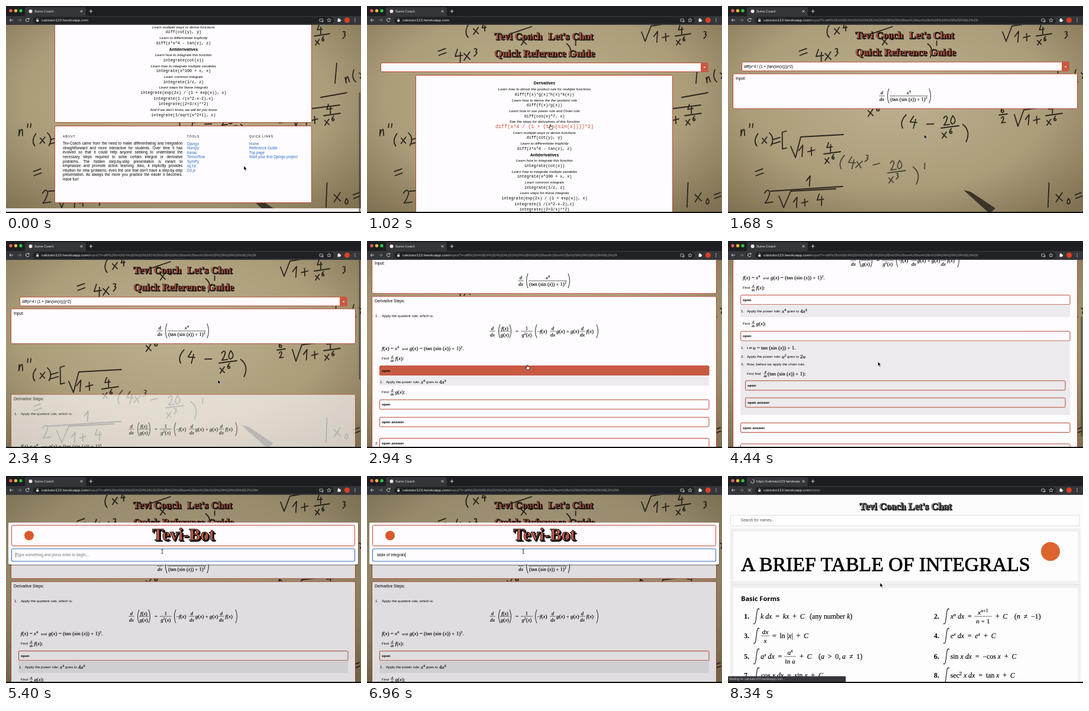
Animation, 600 px wide and 351 px high, one loop 8400 ms. Source, as an HTML page:

```html
<!DOCTYPE html>
<html lang="en">
<head>
<meta charset="utf-8">
<title>Sums Coach</title>
<style>
html, body { margin: 0; width: 100%; height: 100%; overflow: hidden; background: #000; }
svg { display: block; }
#stage { width: 600px; height: 351px; }
text, .about { font-family: "Liberation Sans", Arial, sans-serif; white-space: pre; }
.serif { font-family: "Liberation Serif", Times, serif; }
.mono { font-family: "Liberation Mono", Courier, monospace; }
.head { font-family: "Open Sans", "Noto Sans", sans-serif; }
.about { font-size: 6.3px; line-height: 7.6px; color: #000; text-align: justify; text-align-last: justify; white-space: normal; }
.about span { display: block; text-align-last: left; }
</style>
</head>
<body>
<svg id="stage" viewBox="0 0 600 351"></svg>
<script>
const LOOP = 8400, STEP = 60;
const RED = '#c85a42', EDGE = '#b84630', WHITE = '#fefcfe', INK = '#000';
const SITE = 'calctutor123.herokuapp.com';
const QUERY = 'diff(x^4 / (1 + (tan(sin(x))))^2)';
const PATH = '/input/?i=diff%28x%5E4%20/%20%281%20%2B%20%28tan%28sin%28x%29%29%29%29%5E2%29';
const $ = id => document.getElementById(id);

// Drawing helpers; text is centred vertically on y.
const text = (x, y, s, size, attrs = '') =>
  `<text x="${x}" y="${y + size * .35}" font-size="${size}" ${attrs}>${s}</text>`;
const mid = (x, y, s, size, attrs = '') => text(x, y, s, size, 'text-anchor="middle" ' + attrs);
const rect = (x, y, w, h, fill, attrs = '') =>
  `<rect x="${x}" y="${y}" width="${w}" height="${h}" fill="${fill}" ${attrs}/>`;
const card = (x, y, w, h, attrs = '') =>
  rect(x + .5, y + .5, w - 1, h - 1, WHITE, `stroke="${EDGE}" rx="2" ${attrs}`);
const line = (d, attrs = '') => `<path d="${d}" fill="none" stroke="#111" ${attrs}/>`;
const group = (id, s, attrs = '') => `<g id="${id}" ${attrs}>${s}</g>`;
const title = (x, y, s, size, fill, attrs = '') =>
  text(x + size * .07, y + size * .06, s, size, `class="serif" font-weight="700" stroke="#111" ${attrs}`) +
  text(x, y, s, size, `class="serif" font-weight="700" fill="${fill}" stroke="#111" stroke-width="${size * .03}" ${attrs}`);

// Math markup: ^ raises, letters are italic, [words] and function names stay upright.
const markup = s => s.replace(/\^(?:\{(.*?)\}|(.))|\[(.*?)\]|tan|sin|cos|sec|ln|[a-zA-Z]+/g, (all, many, one, plain) =>
  many || one ? `<tspan baseline-shift="super" font-size="70%">${markup(many || one)}</tspan>`
  : plain ? plain
  : /^(tan|sin|cos|sec|ln)$/.test(all) ? all
  : `<tspan font-style="italic">${all}</tspan>`);
const math = (x, y, s, size = 9, attrs = '') =>
  text(x, y, markup(s), size, 'class="serif" stroke="#000" stroke-width=".15" ' + attrs);
const frac = (x, y, top, bottom, w, size = 8.6) =>
  math(x, y - size * .62, top, size, 'text-anchor="middle"') +
  math(x, y + size * .68, bottom, size, 'text-anchor="middle"') +
  line(`M${x - w / 2},${y}h${w}`, 'stroke-width=".6"');
const ddx = (x, y, size = 8.6) => frac(x, y, 'd', 'dx', size * 1.1, size);
const paren = (x, y, h, dir) => line(`M${x + 2 * dir},${y - h / 2}q${-5 * dir},${h / 2} 0,${h}`, 'stroke-width=".9"');
const integral = (x, y) => line(`M${x + 9},${y - 12}q-3,-3 -4,4l-2,15q-1,8 -4,5`, 'stroke-width="1.1"');

// Pen strokes of the handwriting, 14 units tall above the baseline.
const STROKES = {
  0: 'M4,-13q-8,10 -2,13q8,-3 2,-13', 1: 'M0,-8l6,-6l-3,14', 2: 'M0,-11q5,-6 6,0q-2,6 -7,11h9',
  3: 'M1,-13q8,-1 2,6q6,1 -4,8', 4: 'M4,-14l-4,8h9M7,-10l-2,12', 6: 'M6,-13q-9,8 -5,12q5,2 5,-3q-2,-4 -6,0',
  x: 'M0,-8l6,8M7,-9l-8,9', n: 'M0,-8l-1,8q2,-9 5,-8v8', '(': 'M5,-15q-8,10 -3,18', ')': 'M0,-15q8,8 1,19',
  '=': 'M0,-8l9,-2M0,-3l9,-2', '-': 'M0,-5l9,-1', '+': 'M0,-5l9,-1M5,-10l-1,10',
  '[': 'M6,-17l-5,1l-1,20l5,-1', '"': 'M1,-15l-1,5M5,-15l-1,5', "'": 'M2,-17l-1,6', '|': 'M5,-18l-4,22'
};

function backdrop() {
  const stroke = (d, attrs = '') => line(d, `style="stroke:#2a251d" stroke-width="1.8" stroke-linecap="round" stroke-linejoin="round" ${attrs}`);
  const pen = (x, y, s, size, turn = -8) => `<g transform="translate(${x},${y}) rotate(${turn}) scale(${size / 14})">` +
    [...s].map((c, i) => STROKES[c] ? stroke(STROKES[c], `transform="translate(${i * 11},0)" vector-effect="non-scaling-stroke"`) : '').join('') + '</g>';
  const power = (x, y, base, up, size, turn) => pen(x, y, base, size, turn) +
    pen(x + base.length * size * .8, y - size * .5, up, size * .6, turn);
  const quotient = (x, y, top, up, size) => pen(x, y - 4, top, size) +
    stroke(`M${x - 6},${y + 1}l${size * 2},-4`) + power(x - 3, y + size + 3, 'x', up, size);
  return `<defs><radialGradient id="paper" cx=".48" cy=".45" r=".72">
    <stop offset="0" stop-color="#bdb08e"/><stop offset=".6" stop-color="#ab9d7a"/><stop offset="1" stop-color="#7f7151"/>
    </radialGradient></defs>` + rect(0, 0, 600, 351, 'url(#paper)') +
    power(168, 50, '(x', '4', 17) + stroke('M240,48l38,-13') + power(262, 66, 'x', '6', 17) + pen(340, 82, ")'", 17) +
    pen(122, 88, '=', 20) + power(150, 94, '4x', '3', 20) +
    stroke('M464,44l6,16l10,-26l66,-10') + pen(486, 62, '1+', 18) + quotient(527, 50, '4', '6', 13) + pen(570, 54, '3', 11) +
    stroke('M559,97l-3,34') + pen(576, 130, 'n(x', 16, -18) + stroke('M532,155l44,-8') + quotient(543, 185, '4', '6', 14) +
    power(238, 187, 'x', '6', 17) + pen(293, 203, '(4 -', 18, 5) + quotient(366, 206, '20', '6', 15) + pen(400, 224, ')', 22) +
    pen(462, 181, '6', 10) + stroke('M458,185l14,-2') + pen(463, 198, '2', 10) +
    stroke('M484,184l6,20l10,-28l64,-8') + pen(504, 202, '1+', 17) +
    pen(23, 220, 'n"', 18, -4) + pen(46, 234, '(x)', 16, -4) + pen(76, 238, '=[', 20, -4) +
    stroke('M106,238l8,19l9,-35l72,-4') + pen(121, 256, '1+', 19) + quotient(168, 250, '4', '6', 14) +
    `<g opacity=".75">` + power(189, 272, '(4x', '3', 18, 4) + pen(246, 276, '-', 18) +
    quotient(276, 282, '20', '3', 15) + pen(316, 296, ")'", 22) + '</g>' +
    pen(48, 292, '=', 20) + pen(134, 306, '1', 17) + stroke('M72,314l122,-8') + pen(64, 334, '2', 21) +
    stroke('M86,322l8,20l12,-28l76,-4') + pen(112, 342, '1+ 4', 17) +
    pen(538, 334, '|', 26) + pen(556, 332, 'x', 22) + pen(574, 336, '0', 10) + pen(588, 330, '=', 17) +
    `<path d="M398,312l12,3l42,28l-10,9z" fill="#3b342a"/>`;
}

const banner = y =>
  title(215, y, 'Tevi Coach', 17, RED) + title(306, y, "Let's Chat", 17, RED) +
  title(300, y + 29, 'Quick Reference Guide', 17, RED, 'text-anchor="middle"');
const searchBar = y => card(23, y, 554, 16) + rect(564, y, 13, 16, RED, 'rx="2"') +
  mid(570.5, y + 8, '=', 6, 'fill="#fff" font-weight="700"');

function referencePage() {
  const caption = (y, s) => mid(300, y, s, 6.15, 'font-style="italic"');
  const code = (y, s) => mid(300, y, s, 6.72, 'class="mono"');
  const heading = (y, s) => mid(300, y, s, 6.8, 'font-weight="700"');
  const pairs = (y, list) => list.map(([a, b], i) =>
    caption(y + 18.4 * i, a) + (b ? code(y + 18.4 * i + 8.5, b) : '')).join('');
  const links = (x, head, list) => text(x, 400.5, head, 5, 'letter-spacing=".85"') +
    list.map((s, i) => text(x, 412.3 + 7.6 * i, s, 6.33, 'fill="#2a6cc4"')).join('');
  return banner(51) + searchBar(96) + card(82, 117, 435, 260) + heading(130.5, 'Derivatives') +
    pairs(141, [
      ['Learn how to derive the product rule for multiple functions', 'diff(f(x)*g(x)*h(x)*k(x))'],
      ['Learn how to derive the the quotient rule', 'diff(f(x)/g(x))'],
      ['Learn how to use power rule and Chain rule', 'diff(cos(x)^7, x)'],
      ['See the steps for derivatives of this function', ''],
      ['Learn multiple ways to derive functions', 'diff(cot(y), y)'],
      ['Learn to differentiate implicitly', 'diff(z*x^4 - tan(z), z)']]) +
    mid(300, 204.7, QUERY, 6.72, 'id="pick" class="mono"') + heading(252.5, 'Antiderivatives') +
    pairs(262, [
      ['Learn how to integrate this function', 'integrate(cot(x))'],
      ['Learn how to integrate multiple variables', 'integrate(x^100 + x, x)'],
      ['Learn common integrals', 'integrate(1/z, z)'],
      ['Learn steps for these integrals', 'integrate(exp(2x) / (1 + exp(x)), x)']]) +
    code(335.5, 'integrate(1 /(x^2-x-2),x)') + code(344.7, 'integrate((2+3/x)**2)') +
    caption(354.8, "And if we don't know, we will let you know") + code(363.3, 'integrate(1/sqrt(x^2+1), x)') +
    card(82, 382, 435, 131) + text(96, 400.5, 'ABOUT', 5, 'letter-spacing=".85"') +
    `<foreignObject x="96" y="408.3" width="202.5" height="80"><div class="about">Tev-Coach came from the need to make differentiating and integration<br>
    straightforward and more interactive for students. Over time it has<br>evolved so that it could help anyone seeking to understand the<br>
    necessary steps required to solve certain integral or derivative<br>problems. The hidden step-by-step presentation is meant to<br>
    emphasize and promote active learning. Also, it implicitly provides<br>intuition for new problems, even the one that don't have a step-by-step<br>
    presentation. As always the more you practice the easier it becomes.<span>Have fun!</span></div></foreignObject>` +
    links(306, 'TOOLS', ['Django', 'Numpy', 'Keras', 'Tensorflow', 'SymPy', 'NLTK', 'D3.js']) +
    links(411, 'QUICK LINKS', ['Home', 'Reference Guide', 'Top page', 'Start your first Django project']) +
    rect(0, 522, 600, 6, '#efedec');
}

function resultPage() {
  const note = (x, y, s) => text(x, y, s, 6.1);
  const button = (id, x, y, s, fill = WHITE) =>
    rect(x + .5, y + .5, 599 - 2 * x - .5, 16, fill, `id="${id}" stroke="${EDGE}" rx="1.5"`) +
    text(x + 4, y + 8.5, s, 6.1, 'font-weight="700"');
  const panel = (id, y, s) => `<svg id="${id}" x="21" y="${y}" width="557" height="0" overflow="hidden">` +
    rect(0, 0, 557, 160, '#eceaed') + s + '</svg>';
  const find = (y, fn) => note(25, y, 'Find') + ddx(42.5, y, 5.4) + math(47.5, y, fn + ':');
  const powerRule = (y, n, from, to, x) => note(1, y, n) + note(11, y, 'Apply the power rule:') +
    math(70, y, from) + note(x, y, 'goes to') + math(x + 22, y, to);
  const formula = ddx(212, 238) + paren(223, 238, 23, 1) + frac(233, 238, 'f(x)', 'g(x)', 17) + paren(243, 238, 23, -1) +
    math(251, 238, '=') + frac(270, 238, '1', 'g^2(x)', 20) + paren(285, 238, 23, 1) + math(287, 238, '−f(x)') +
    ddx(314, 238) + math(320, 238, 'g(x) + g(x)') + ddx(364, 238) + math(370.5, 238, 'f(x)') + paren(390, 238, 23, -1);
  const lower = find(324, 'g(x)') + button('openG', 21, 336.7, 'open') +
    panel('panelG', 353.5,
      note(1, 11, '1.') + note(11, 11, 'Let') + math(21, 11, 'u = tan (sin (x)) + 1.') +
      powerRule(26.5, '2.', 'u^2', '2u', 79) + note(1, 39.5, '3.') + note(11, 39.5, 'Now, before we apply the chain rule.') +
      note(11, 55.5, 'First find') + ddx(42, 55.5, 5.4) + math(46, 55.5, '(tan (sin (x)) + 1):') +
      `<g transform="translate(-21,0)">${button('inner', 29, 67, 'open', '#eceaed')}${button('innerAnswer', 29, 96, 'open answer', '#eceaed')}</g>`) +
    group('answers', button('a1', 21, 366.5, 'open answer') + note(14, 410.5, '2.') + button('a2', 21, 402, 'open answer'));
  return banner(49.5) + searchBar(94.5) + text(27, 102.7, QUERY, 6.45) +
    card(8, 114.5, 583, 60) + text(13, 123, 'Input:', 6.8) +
    ddx(260, 152.5) + paren(270, 152.5, 25, 1) + frac(305.5, 152.5, 'x^4', '(tan (sin (x)) + 1)^2', 65) + paren(342, 152.5, 25, -1) +
    group('steps', card(8, 178.5, 583, 260, 'id="stepCard"') + text(13, 187, 'Derivative Steps:', 6.8) +
      note(14, 212, '1.') + note(25, 212, 'Apply the quotient rule, which is:') + formula +
      math(25, 267, 'f(x) = x^4') + note(59, 267.5, 'and') + math(72, 267, 'g(x) = (tan (sin (x)) + 1)^2.') +
      find(284, 'f(x)') + button('openF', 21, 296.3, 'open') +
      panel('panelF', 313, powerRule(11.3, '1.', 'x^4', '4x^3', 79)) + group('lower', lower));
}

const chatBox = () =>
  rect(4, 81, 592, 71, '#000', 'opacity=".25" rx="3"') + rect(4, 79, 591, 71, WHITE, 'rx="2"') +
  card(9, 83, 581, 36) + '<circle cx="39" cy="101" r="8" fill="#d9582c"/>' +
  title(300, 99, 'Tevi-Bot', 29, RED, 'text-anchor="middle"') +
  rect(9.5, 123.5, 580, 21, WHITE, 'stroke="#4079c4" stroke-width="1.2" rx="2"') +
  text(17, 134, '', 6.5, 'id="entry"') + rect(16.3, 130, .6, 8, '#111', 'id="caret"');

function tablePage() {
  const row = (n, x, y, s = '') => text(x, y, n + '.', 12, 'class="serif" font-weight="700"') + integral(x + 17, y) + s;
  const m = (x, y, s) => math(x, y, s, 11.8);
  const f = (x, y, a, b, w) => frac(x, y, a, b, w, 11.4);
  return rect(0, 32, 600, 319, '#fdfcfd') + title(300, 51, "Tevi Coach Let's Chat", 16.4, '#8c8c8c', 'text-anchor="middle"') +
    rect(4.5, 66.5, 590, 18, '#fff', 'stroke="#ddd"') + text(21.5, 75, 'Search for names..', 6.6, 'fill="#555"') +
    rect(4, 89, 592, 262, '#f0f0f0') + rect(9, 94, 582, 84, '#fefdfe') + rect(4, 184, 592, 1, '#e2e2e2') + rect(9, 190, 582, 161, '#fefdfe') +
    text(22, 149.5, 'A BRIEF TABLE OF INTEGRALS', 33.8, 'class="serif" stroke="#000" stroke-width=".75"') +
    '<circle cx="545" cy="128" r="16" fill="#dd642c"/>' +
    text(22, 208.5, 'Basic Forms', 11, 'class="head" font-weight="700"') +
    row(1, 27, 238, m(55, 238, 'k dx  =  kx  +  C') + m(138, 238, '([any number] k)')) +
    row(2, 348, 238, m(376, 238, 'x^n dx  =') + f(431, 238, 'x^{n+1}', 'n + 1', 30) + m(452, 238, '+  C') + m(484, 238, '(n  ≠  −1)')) +
    row(3, 27, 271, f(63, 271, 'dx', 'x', 14) + m(75, 271, '=  ln |x|  +  C')) +
    row(4, 348, 271, m(376, 271, 'e^x dx  =  e^x  +  C')) +
    row(5, 27, 306, m(55, 306, 'a^x dx  =') + f(105, 306, 'a^x', 'ln a', 20) + m(121, 306, '+  C') + m(153, 306, '(a  >  0, a  ≠  1)')) +
    row(6, 348, 306, m(376, 306, 'sin x dx  =  −cos x  +  C')) +
    row(7, 27, 338, m(56, 338, 'cos x dx  =  sin x  +  C')) +
    row(8, 348, 338, m(376, 338, 'sec^2 x dx  =  tan x  +  C')) +
    rect(0, 339.5, 199, 10, '#35363a', 'rx="1.5"') + text(2, 344, `Waiting for ${SITE}...`, 5.1, 'fill="#ccc"');
}

function browser() {
  const icon = (d, w = .9, shade = '#dfe1e5') => line(d, `style="stroke:${shade}" stroke-width="${w}"`);
  const dot = (x, y, r, fill) => `<circle cx="${x}" cy="${y}" r="${r}" fill="${fill}"/>`;
  return rect(0, 0, 600, 18, '#1d1e21') + rect(0, 17, 600, 15, '#35363a') + rect(32, 2, 103, 17, '#35363a', 'rx="3"') +
    dot(8, 8, 2.7, '#f25f57') + dot(16.5, 8, 2.7, '#f5bd2e') + dot(25, 8, 2.7, '#2bc840') +
    group('icon', dot(41.5, 9, 3, '#f3e6e2')) + group('spinner', icon('M41.5,6a3,3 0 1 1 -3,3')) +
    text(48, 9, '', 5.7, 'id="tab" fill="#e8eaed"') +
    icon('M125.5,7l4,4m0,-4l-4,4M140.5,9h6m-3,-3v6') +
    rect(46, 18.5, 508, 11.5, '#202124', 'rx="5.7"') +
    icon('M12,24h-6m2.5,-2.5l-2.5,2.5l2.5,2.5') + icon('M20,24h6m-2.5,-2.5l2.5,2.5l-2.5,2.5', .9, '#85888c') +
    group('reload', icon('M38.5,22a2.8,2.8 0 1 0 .3,3M39,20.5v2h-2')) + group('stop', icon('M34,21.5l5,5m0,-5l-5,5')) +
    rect(51.2, 23.5, 4, 3, '#dfe1e5') + icon('M52,23.5v-1.2a1.2,1.2 0 0 1 2.4,0v1.2', .7) +
    `<text x="60" y="26.2" font-size="6.25" fill="#f1f3f4">${SITE}<tspan id="path" fill="#9aa0a6"></tspan></text>` +
    icon('M530,22h5v4h-5zM536,24v3h-3', .7) +
    icon('M546,20.8l1,2.2l2.3,.2l-1.7,1.5l.5,2.3l-2.1,-1.2l-2.1,1.2l.5,-2.3l-1.7,-1.5l2.3,-.2z', .7) +
    rect(560.5, 22.3, 4.3, 4.5, '#f1f3f4') + dot(562.5, 22, 1.2, '#f1f3f4') + dot(565, 24.5, 1.2, '#f1f3f4') +
    dot(576.5, 24, 4.5, '#dc4022') + [21.5, 24, 26.5].map(y => dot(590, y, .7, '#dfe1e5')).join('') +
    rect(0, 349, 600, 2, '#0b0b0b');
}

const pointers = () =>
  group('arrow', '<path d="M0,0v7.5l1.8,-1.6l1.2,2.8l1.3,-.6l-1.2,-2.7h2.3z" fill="#000" stroke="#fff" stroke-width=".6"/>') +
  group('hand', '<path d="M-.8,-2.5q.8,-1 1.4,0v2.4l3,.8q.8,.4 .5,2l-.7,2.4h-4l-2.3,-3.3q0,-1.1 1.2,-.4l.9,.7z" fill="#fff" stroke="#000" stroke-width=".7"/>') +
  group('beam', line('M-1.5,-3.5q1.5,0 1.5,1.2v4.8q0,1.2 -1.5,1.2M1.5,-3.5q-1.5,0 -1.5,1.2M0,2.5q0,1.2 1.5,1.2', 'stroke-width=".8"'));

$('stage').innerHTML = backdrop() +
  group('reference', referencePage(), `fill="${INK}"`) + group('result', resultPage(), `fill="${INK}"`) +
  rect(0, 32, 600, 319, '#000', 'id="dim"') + group('chat', chatBox()) + group('table', tablePage()) +
  rect(596.5, 32, 2.5, 203, '#333', 'id="bar" rx="1.2" opacity=".65"') + browser() + group('pointer', pointers());

// Value at time t from [time, value] keys.
function track(t, keys, ease = p => p * p * (3 - 2 * p)) {
  const i = keys.findIndex(k => k[0] > t);
  if (i === 0) return keys[0][1];
  if (i < 0) return keys[keys.length - 1][1];
  const [t0, a] = keys[i - 1], [t1, b] = keys[i];
  return a + (b - a) * ease((t - t0) / (t1 - t0));
}
const linear = p => p;
const within = (t, ...spans) => spans.some(([a, b]) => t >= a && t < b);
const show = (id, on) => $(id).style.display = on ? '' : 'none';
const set = (id, name, value) => $(id).setAttribute(name, value);
const shift = (id, x, y) => set(id, 'transform', `translate(${x},${y})`);

const LOADED = 1500, CHAT = 5040, TABLE = 7900;
const MOVES = [[0, 402, 271], [300, 402, 271], [900, 310, 204], [1400, 310, 204], [2000, 358, 235], [2400, 358, 235],
  [2760, 271, 213], [3000, 271, 213], [3180, 240, 278], [3420, 240, 278], [3780, 234, 239], [4260, 234, 239],
  [4920, 340, 51], [5040, 340, 51], [5340, 264, 128], [7300, 264, 128], [7900, 257, 181]];
const MESSAGE = 'table of integrals';

function draw(t) {
  const onTable = t >= TABLE, onResult = t >= LOADED && !onTable;
  show('reference', t < LOADED);
  show('result', onResult);
  show('table', onTable);

  const scroll = t < LOADED ? track(t, [[120, 179], [780, 0]])
    : track(t, [[2400, 0], [2700, 85], [3420, 85], [3720, 243], [4320, 243], [4800, 0]]);
  shift('reference', 0, -scroll);
  shift('result', 0, -scroll);
  set('bar', 'y', 32 + scroll * (t < LOADED ? .639 : .47));
  show('bar', within(t, [0, 900], [2280, 2880], [3420, 4020], [4320, 5000]));

  const picked = within(t, [900, LOADED]);
  set('pick', 'font-size', picked ? 8.4 : 6.72);
  set('pick', 'fill', picked ? '#cf4a2d' : INK);

  const f = track(t, [[2760, 0], [2940, 17], [3000, 21]], linear);
  const g = track(t, [[3240, 0], [3480, 125.5]]);
  shift('steps', 0, track(t, [[2200, 100], [2340, 81], [2520, 0]], linear));
  set('steps', 'opacity', track(t, [[2160, 0], [2340, .65], [2520, 1]], linear));
  set('stepCard', 'height', 259 + f + g);
  set('panelF', 'height', f);
  set('panelG', 'height', g);
  shift('lower', 0, f);
  shift('answers', 0, g);
  set('openF', 'fill', within(t, [2700, 3060]) ? RED : WHITE);
  set('openG', 'fill', within(t, [3120, 3960]) ? RED : WHITE);
  set('innerAnswer', 'fill', within(t, [3720, 4320]) ? RED : '#eceaed');

  const chat = track(t, [[CHAT, 0], [5280, 1], [7500, 1], [7680, 0]]);
  show('chat', !onTable && chat > 0);
  set('chat', 'opacity', chat);
  shift('chat', 0, -40 * (1 - chat));
  set('dim', 'opacity', onTable ? 0 : .12 * chat);
  const typed = MESSAGE.slice(0, Math.max(0, Math.floor((t - 5640) / 60)));
  $('entry').textContent = typed || 'Type something and press enter to begin...';
  set('entry', 'fill', typed ? INK : '#6c757d');
  set('caret', 'x', typed ? 17 + $('entry').getComputedTextLength() : 16.3);

  $('tab').textContent = onTable ? 'https://calctutor123.herokuap' : 'Sums Coach';
  $('path').textContent = onTable ? '/table/' : onResult ? PATH + (t >= CHAT ? '#' : '') : '';
  for (const id of ['spinner', 'stop']) show(id, onTable);
  for (const id of ['icon', 'reload']) show(id, !onTable);
  set('spinner', 'transform', `rotate(${(t - 8340) * .5} 41.5 9)`);

  const along = axis => track(t, MOVES.map(k => [k[0], k[axis]]));
  shift('pointer', along(1), along(2));
  const hand = within(t, [840, LOADED], [2700, 3060], [3120, 3480], [3720, 4320], [4860, 5100]);
  const beam = within(t, [5280, 7440]);
  show('hand', hand);
  show('beam', beam);
  show('arrow', !hand && !beam);
}

const start = performance.now();
function tick() {
  const t = (performance.now() - start) % LOOP;
  draw(Math.floor(t / STEP) * STEP);
  requestAnimationFrame(tick);
}
tick();
</script>
</body>
</html>
```
